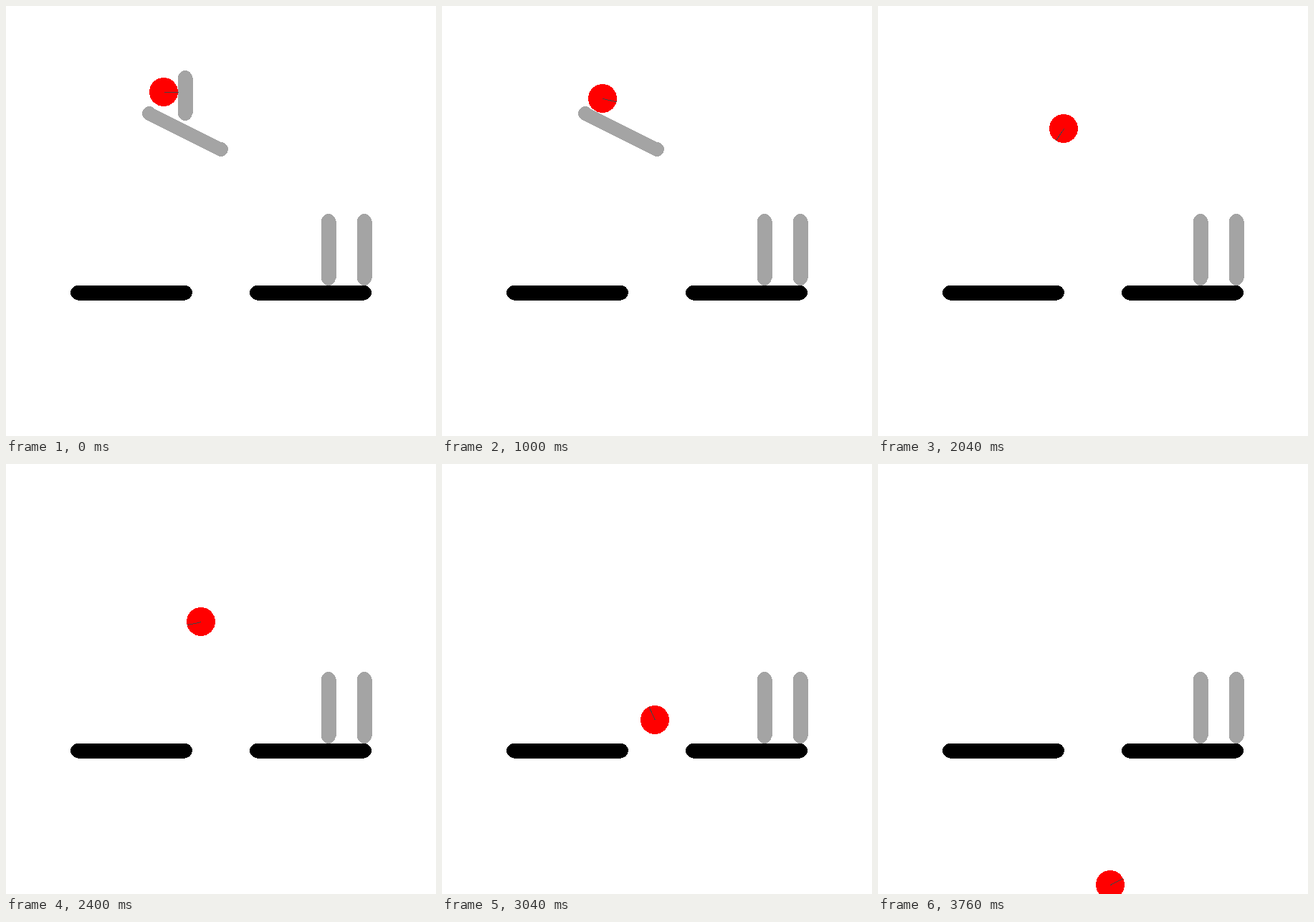
Recreate the animation shown at these times as an HTML page. Size 600x600 px, loop 3800 ms.

```html
<!DOCTYPE html>
<html lang="en">
<head>
<meta charset="utf-8">
<title>Rolling ball</title>
<style>
  html, body { margin: 0; width: 100%; height: 100%; overflow: hidden; background: #fff; }
  svg { display: block; width: 100vw; height: 100vh; shape-rendering: crispEdges; }
</style>
</head>
<body>
<svg id="stage" viewBox="0 0 600 600">
  <g id="ball">
    <circle r="20" fill="red"/>
    <line id="spoke" x1=".5" y1=".5" stroke="#444"/>
  </g>
</svg>
<script>
const LOOP = 3.8, STEP = 0.04;
const GRAVITY = 155.8, RADIUS = 20;
const WALL_GONE = 0.56, RAMP_GONE = 1.48, FALL_START = 0.035, LEAVE = 1.47;
const START = { x: 220, y: 120 }, REST_Y = 126.58;
const COS = 2 / Math.sqrt(5), SIN = 1 / Math.sqrt(5);
const ROLL = GRAVITY * SIN * 2 / 3; // solid disc rolling without slipping

const stage = document.getElementById('stage');
const ball = document.getElementById('ball');
const spoke = document.getElementById('spoke');

function add(parent, tag, attrs) {
  const node = document.createElementNS('http://www.w3.org/2000/svg', tag);
  for (const key in attrs) node.setAttribute(key, attrs[key]);
  return parent.appendChild(node);
}

function bar(x1, y1, x2, y2, color, width = 21) {
  const group = add(stage, 'g', { fill: color, stroke: 'none' });
  add(group, 'circle', { cx: x1, cy: y1, r: 10 });
  add(group, 'circle', { cx: x2, cy: y2, r: 10 });
  const dx = x1 === x2 ? 0.5 : 0, dy = dx ? 0 : 0.5;
  add(group, 'line', {
    x1: x1 + dx, y1: y1 + dy, x2: x2 + dx, y2: y2 + dy,
    stroke: color, 'stroke-width': width
  });
  return group;
}

const GRAY = '#a4a4a4';
bar(450, 300, 450, 380, GRAY);
bar(500, 300, 500, 380, GRAY);
bar(100, 400, 250, 400, '#000');
bar(350, 400, 500, 400, '#000');
const wall = bar(250, 100, 250, 150, GRAY);
const ramp = bar(200, 150, 300, 200, GRAY, 18.8);
stage.append(ball);

function pose(t) {
  if (t < WALL_GONE) {
    const fall = Math.max(0, t - FALL_START);
    return { x: START.x, y: Math.min(REST_Y, START.y + GRAVITY * fall ** 2 / 2), angle: 0 };
  }
  const rolling = Math.min(t, LEAVE) - WALL_GONE;
  const flying = Math.max(0, t - LEAVE);
  const distance = ROLL * rolling ** 2 / 2 + ROLL * rolling * flying;
  return {
    x: START.x + distance * COS,
    y: REST_Y + distance * SIN + GRAVITY * flying ** 2 / 2,
    angle: distance / RADIUS
  };
}

function draw(t) {
  const { x, y, angle } = pose(t);
  ball.setAttribute('transform', `translate(${Math.round(x)} ${Math.round(y)})`);
  spoke.setAttribute('x2', 0.5 + RADIUS * Math.cos(angle));
  spoke.setAttribute('y2', 0.5 + RADIUS * Math.sin(angle));
  wall.style.display = t < WALL_GONE ? '' : 'none';
  ramp.style.display = t < RAMP_GONE ? '' : 'none';
}

let begin;
function tick(now) {
  begin ??= now;
  const elapsed = (now - begin) / 1000 % LOOP;
  draw(Math.floor(elapsed / STEP + 1e-6) * STEP + 1e-9);
  requestAnimationFrame(tick);
}
draw(0);
requestAnimationFrame(tick);
</script>
</body>
</html>
```
